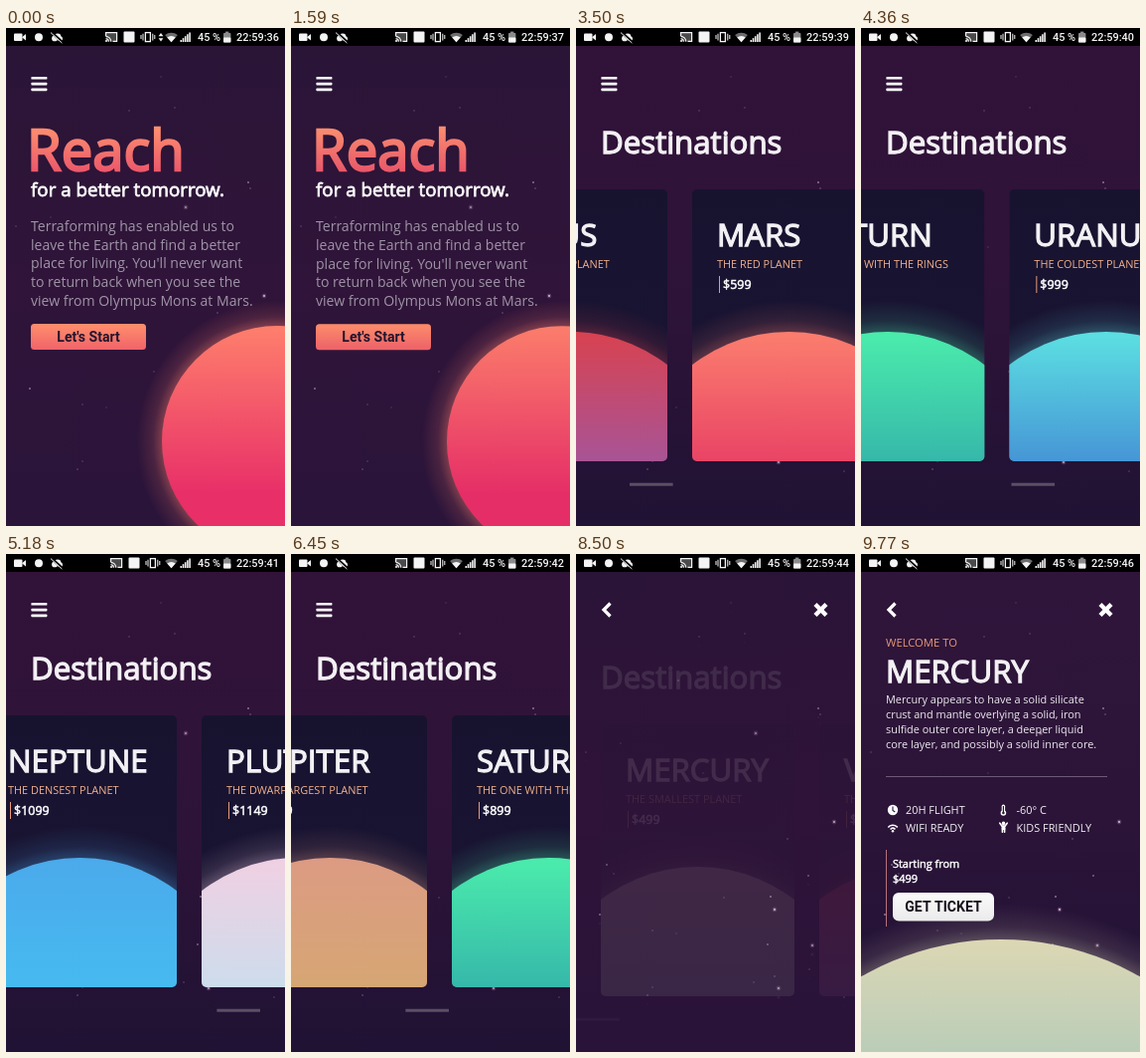
Write an HTML page with a canvas that moves like this. It is 281 px wide and 500 px high and loops after 9.81 s.

```html
<!DOCTYPE html>
<html lang="en">
<head>
<meta charset="utf-8">
<title>Space travel</title>
<style>
  html, body { margin: 0; width: 100%; height: 100%; overflow: hidden; background: #2b1439; }
  canvas { display: block; width: 281px; height: 500px; }
</style>
</head>
<body>
<canvas id="stage"></canvas>
<script>
const W = 281, H = 500, LOOP = 9810, TICK = 10;
const U = W / 360; // one app unit in stage pixels
const SANS = '"Open Sans", "Noto Sans", sans-serif';
const UI = 'Roboto, sans-serif';
const WHITE = '#f3f1f4', ORANGE = '#e89a78', PEACH = '#f2b18c';

const dpr = window.devicePixelRatio || 1;
const stage = document.getElementById('stage');
const layer = document.createElement('canvas');
for (const c of [stage, layer]) {
  c.width = Math.round(W * dpr);
  c.height = Math.round(H * dpr);
}
const screen = stage.getContext('2d');
const page = layer.getContext('2d');
let g = screen;

// name, tagline, price, top colour, bottom colour
const PLANETS = [
  ['MERCURY', 'THE SMALLEST PLANET', '$499', '220,215,180', '186,205,184'],
  ['VENUS', 'THE HOTTEST PLANET', '$549', '216,66,80', '168,84,150'],
  ['MARS', 'THE RED PLANET', '$599', '251,126,110', '233,68,101'],
  ['JUPITER', 'THE LARGEST PLANET', '$799', '220,155,131', '214,166,116'],
  ['SATURN', 'THE ONE WITH THE RINGS', '$899', '75,236,172', '54,184,170'],
  ['URANUS', 'THE COLDEST PLANET', '$999', '92,224,226', '70,150,214'],
  ['NEPTUNE', 'THE DENSEST PLANET', '$1099', '75,170,235', '70,186,240'],
  ['PLUTO', 'THE DWARF PLANET', '$1149', '240,208,226', '205,220,236']
];

// x, y, brightness
const STARS = [
  [170, 80, .4], [124, 83, .4], [103, 127, .5], [244, 155, .7], [246, 161, .5], [181, 180, .8],
  [45, 190, .3], [10, 199, .4], [128, 220, .3], [260, 269, 1], [213, 286, .5], [31, 312, .6],
  [38, 321, .4], [234, 323, .6], [149, 345, .4], [196, 344, .7], [200, 357, 1], [77, 378, .4],
  [101, 381, .3], [24, 362, .7], [193, 392, .6], [238, 393, .9], [235, 417, .4], [77, 435, .4],
  [72, 443, .5], [204, 436, .9], [200, 424, .5], [179, 430, .4], [270, 445, .4], [156, 49, .3]
];

// time, scroll offset, speed
const SCROLL = [
  [3070, 0, .3], [3500, 348, .8], [5180, 1368, .3],
  [6100, 1529, 0], [6450, 743, -2], [6950, 0, -.9]
];

const clamp = v => Math.max(0, Math.min(1, v));

// cubic-bezier(.25, .1, .25, 1)
function ease(x) {
  x = clamp(x);
  let lo = 0, hi = 1;
  const curve = (p, a, b) => 3 * (1 - p) * (1 - p) * p * a + 3 * (1 - p) * p * p * b + p * p * p;
  for (let i = 0; i < 20; i++) {
    const mid = (lo + hi) / 2;
    if (curve(mid, .25, .25) < x) lo = mid; else hi = mid;
  }
  return curve(lo, .1, 1);
}

function scrollAt(t) {
  for (let i = 1; i < SCROLL.length; i++) {
    const [t0, s0, v0] = SCROLL[i - 1], [t1, s1, v1] = SCROLL[i];
    if (t < t0 || t >= t1) continue;
    const d = t1 - t0, p = (t - t0) / d, q = 1 - p;
    return q * q * ((1 + 2 * p) * s0 + p * d * v0) + p * p * ((3 - 2 * p) * s1 - q * d * v1);
  }
  return 0;
}

function text(str, x, y, size, color, { font = SANS, weight = 400, fat = false, align = 'left' } = {}) {
  g.font = `${weight} ${size}px ${font}`;
  g.textAlign = align;
  g.fillStyle = color;
  g.fillText(str, x, y);
  if (!fat) return;
  g.strokeStyle = color;
  g.lineWidth = size / 24;
  g.lineJoin = 'miter';
  g.miterLimit = 3;
  g.strokeText(str, x, y);
}

function rect(x, y, w, h, color, r = 0) {
  g.fillStyle = color;
  g.beginPath();
  g.roundRect(x, y, w, h, r);
  g.fill();
}

function disc(x, y, r, color) {
  g.fillStyle = color;
  g.beginPath();
  g.arc(x, y, r, 0, Math.PI * 2);
  g.fill();
}

function line(points, color, width, cap = 'butt') {
  g.strokeStyle = color;
  g.lineWidth = width;
  g.lineCap = cap;
  g.lineJoin = 'miter';
  g.beginPath();
  points.forEach(([x, y]) => g.lineTo(x, y));
  g.stroke();
}

function poly(points, color) {
  g.fillStyle = color;
  g.beginPath();
  points.forEach(([x, y]) => g.lineTo(x, y));
  g.fill();
}

function arc(x, y, r, from, to, color, width) {
  g.strokeStyle = color;
  g.lineWidth = width;
  g.lineCap = 'butt';
  g.beginPath();
  g.arc(x, y, r, from, to);
  g.stroke();
}

function fan(x, y, r, color) {
  g.fillStyle = color;
  g.beginPath();
  g.moveTo(x, y);
  g.arc(x, y, r, -Math.PI * .73, -Math.PI * .27);
  g.fill();
}

function fade(y0, y1, ...colors) {
  const grad = g.createLinearGradient(0, y0, 0, y1);
  colors.forEach((c, i) => grad.addColorStop(i / (colors.length - 1), c));
  return grad;
}

function planet(x, y, r, top, bottom, yEnd, glow, strength) {
  const halo = g.createRadialGradient(x, y, r, x, y, r + glow);
  halo.addColorStop(0, `rgba(${top},${strength})`);
  halo.addColorStop(.35, `rgba(${top},${strength * .4})`);
  halo.addColorStop(1, `rgba(${top},0)`);
  disc(x, y, r + glow, halo);
  disc(x, y, r, fade(y - r, yEnd, `rgb(${top})`, `rgb(${bottom})`));
}

function backdrop() {
  rect(0, 0, W, H, fade(18, H, '#2a1537', '#301439', '#2a143a'));
}

function stars() {
  for (const [x, y, b] of STARS) {
    disc(x, y, .5 + b * .65, `rgba(235,205,225,${b * .75})`);
    if (b > .75) disc(x, y, 2.4, 'rgba(220,180,215,.18)');
  }
}

function home() {
  planet(273, 415, 116, '254,127,108', '232,47,104', 468, 26, .38);
  text('Reach', 21, 143, 72 * U, fade(98, 148, '#ff9270', '#e9536a'), { fat: true });
  text('for a better tomorrow.', 25, 169, 24 * U, '#fff', { fat: true });
  [
    'Terraforming has enabled us to',
    'leave the Earth and find a better',
    "place for living. You'll never want",
    'to return back when you see the',
    'view from Olympus Mons at Mars.'
  ].forEach((s, i) => text(s, 25, 204 + i * 24 * U, 18 * U, '#9f95a8'));
  rect(25, 297, 116, 26, fade(297, 323, '#ff8f6c', '#f0636a'), 3.5);
  text("Let's Start", 83, 315, 18 * U, '#23162c', { font: UI, weight: 700, align: 'center' });
}

function card([name, tagline, price, top, bottom], x) {
  if (x > W || x < -195) return;
  g.save();
  g.beginPath();
  g.roundRect(x, 162, 195, 273, 5);
  g.clip();
  rect(x, 162, 195, 273, fade(162, 435, '#17132f', '#1a1434'));
  planet(x + 97.5, 465, 160, top, bottom, 435, 32, .29);
  text(name, x + 25, 219, 40 * U, WHITE, { fat: true });
  text(tagline, x + 25, 241, 14 * U, PEACH);
  rect(x + 27, 249, 1, 17, ORANGE);
  text(price, x + 31, 262, 16 * U, '#fff', { fat: true });
  g.restore();
}

function destinations(t) {
  const s = scrollAt(t);
  rect(0, -12, W, H + 24, fade(18, H, 'rgba(50,18,57,.9)', 'rgba(47,19,57,.9)', 'rgba(31,18,52,.9)'));
  stars();
  text('Destinations', 25, 126, 40 * U, WHITE, { fat: true });
  PLANETS.forEach((p, i) => card(p, 25 + 220 * i - s));

  const ratio = W / 1810;
  let bar = 0;
  if (t >= 3090) bar = 1 - clamp((t - 7210) / 270);
  if (t >= 8250) bar = 1;
  if (bar > 0) rect(s * ratio, 456.7, W * ratio, 3, `rgba(128,122,132,${bar * .6})`);
}

function features() {
  disc(32, 257, 5.2, '#fff');
  line([[32, 253.6], [32, 257.4], [34.3, 259]], '#2b1439', 1.1);
  rect(141.7, 251.5, 3.4, 8, '#fff', 1.7);
  disc(143.4, 260, 2.8, '#fff');
  rect(142.8, 253, 1.2, 7, '#2b1439');
  disc(143.4, 260, 1.3, '#2b1439');
  for (const r of [3.2, 6.3]) arc(32, 278.6, r, -Math.PI * .77, -Math.PI * .23, '#fff', 1.6);
  disc(32, 278.3, 1.2, '#fff');
  disc(143.5, 270.4, 1.8, '#fff');
  line([[139.8, 270.2], [142, 273.3], [145, 273.3], [147.2, 270.2]], '#fff', 1.6, 'round');
  rect(141.6, 272.5, 3.8, 4.5, '#fff', 1);
  rect(141.6, 275, 1.6, 5, '#fff', .7);
  rect(143.8, 275, 1.6, 5, '#fff', .7);
  text('20H FLIGHT', 45, 261, 14 * U, WHITE);
  text('-60° C', 156.5, 261, 14 * U, WHITE);
  text('WIFI READY', 45, 278.5, 14 * U, WHITE);
  text('KIDS FRIENDLY', 156.5, 278.5, 14 * U, WHITE);
}

function detail() {
  rect(0, -12, W, H + 24, fade(18, H, 'rgba(48,21,59,.9)', 'rgba(44,20,57,.9)', 'rgba(30,18,53,.9)'));
  stars();
  const [name, , price, top, bottom] = PLANETS[0];
  planet(140.5, 670, 283, top, bottom, 500, 36, .28);
  text('WELCOME TO', 25, 93, 14.4 * U, ORANGE);
  text(name, 25, 128.5, 40 * U, WHITE, { fat: true });
  [
    'Mercury appears to have a solid silicate',
    'crust and mantle overlying a solid, iron',
    'sulfide outer core layer, a deeper liquid',
    'core layer, and possibly a solid inner core.'
  ].forEach((s, i) => text(s, 25, 150 + i * 14.9, 14 * U, '#eeeaf0'));
  rect(25, 223, 223, 1, '#6d5a77');
  features();
  rect(25, 297, 1, 77, '#b9717a');
  text('Starting from', 32, 315, 14 * U, '#fff', { fat: true });
  text(price, 32, 330, 14 * U, '#fff', { fat: true });
  rect(32, 340, 102, 28.5, fade(340, 368, '#fafafa', '#ebebeb'), 6);
  text('GET TICKET', 83, 359, 18 * U, '#17121c', { font: UI, weight: 700, align: 'center' });
}

function header(inDetail) {
  if (inDetail) {
    line([[34.5, 49.5], [28, 56], [34.5, 62.5]], '#fff', 3.2);
    line([[241, 50.5], [252, 61.5]], '#fff', 4.4);
    line([[252, 50.5], [241, 61.5]], '#fff', 4.4);
  } else {
    for (const y of [49, 54.8, 60.6]) rect(25.4, y, 16, 2.6, '#fff', .7);
  }
}

// Icons left of the wifi sign; they move up when the data arrows go.
function leftOfWifi(c, arrows) {
  g.save();
  if (!arrows) g.translate(5, 0);
  rect(101, 4.6, 10.4, 8.8, 'rgba(244,244,244,.3)');
  line([[100.6, 8], [100.6, 4.6], [111.6, 4.6], [111.6, 13.4], [107.5, 13.4]], c, 1.2);
  disc(101, 13, 1, c);
  for (const r of [3, 5.4]) arc(100.4, 13.8, r, -Math.PI / 2, 0, c, 1.1);
  rect(118.5, 3.5, 11, 11, c, 1);
  g.strokeStyle = c;
  g.lineWidth = 1.3;
  g.strokeRect(140.4, 4.6, 5, 9);
  for (const [x, h] of [[138, 3.4], [136, 2], [147.8, 3.4], [149.8, 2]])
    rect(x - .5, 9.1 - h, 1, h * 2, c);
  if (arrows) {
    poly([[153.6, 8.2], [156, 5], [158.4, 8.2]], c);
    poly([[153.6, 10.2], [156, 13.4], [158.4, 10.2]], c);
  }
  g.restore();
}

function statusBar(t) {
  const c = '#f4f4f4';
  rect(0, 0, W, 18, '#000');
  rect(8, 5.5, 8.5, 7.5, c, 1);
  poly([[16, 9.2], [20, 6], [20, 12.6]], c);
  disc(33, 9.3, 4, c);

  disc(49, 10.4, 2.9, c);
  disc(52, 8.8, 3.4, c);
  disc(54.5, 10.8, 2.5, c);
  line([[45.5, 4], [57, 14.5]], '#000', 2.4);
  line([[45, 4.6], [56.4, 15]], c, 1);

  leftOfWifi(c, t < 270);
  fan(166.5, 14.3, 9.6, '#6e6e6e');
  fan(166.5, 14.3, 6.4, c);
  for (let i = 0; i < 5; i++) rect(175.5 + i * 2.2, 12 - i * 1.9, 1.6, 2 + i * 1.9, c);

  const style = { font: UI, weight: 500 };
  text('45 %', 193, 13, 14 * U, c, style);
  rect(219, 5, 7.4, 9.5, '#8b8b8b', .8);
  rect(221, 3.6, 3.4, 2, '#8b8b8b');
  rect(219, 9.6, 7.4, 4.9, c, .8);
  const sec = 36 + Math.floor((t + 230) / 1000);
  text('22:59:' + sec, 232, 13, 14 * U, c, style);
}

function showPage(draw, t, shown) {
  if (shown <= 0) return;
  g = page;
  g.setTransform(1, 0, 0, 1, 0, 0);
  g.clearRect(0, 0, layer.width, layer.height);
  g.setTransform(dpr, 0, 0, dpr, 0, 0);
  g.translate(0, 10 * (1 - shown));
  draw(t);
  g = screen;
  g.globalAlpha = shown;
  g.drawImage(layer, 0, 0, W, H);
  g.globalAlpha = 1;
}

// Page leaves within 400 ms, then the next one enters within 800 ms.
const leave = (t, start) => 1 - ease((t - start) / 400);
const enter = (t, start) => ease((t - start - 400) / 800);

function render(t) {
  g = screen;
  g.setTransform(dpr, 0, 0, dpr, 0, 0);
  backdrop();
  stars();
  if (t < 1980) showPage(home, t, leave(t, 1580));
  else if (t < 8250) showPage(destinations, t, enter(t, 1580));
  else if (t < 8650) showPage(destinations, t, leave(t, 8250));
  else showPage(detail, t, enter(t, 8250));
  header(t >= 8260);
  statusBar(t);
}

const begin = performance.now();
function tick() {
  const t = (performance.now() - begin) % LOOP;
  render(Math.floor(t / TICK) * TICK);
  requestAnimationFrame(tick);
}
tick();
</script>
</body>
</html>
```
